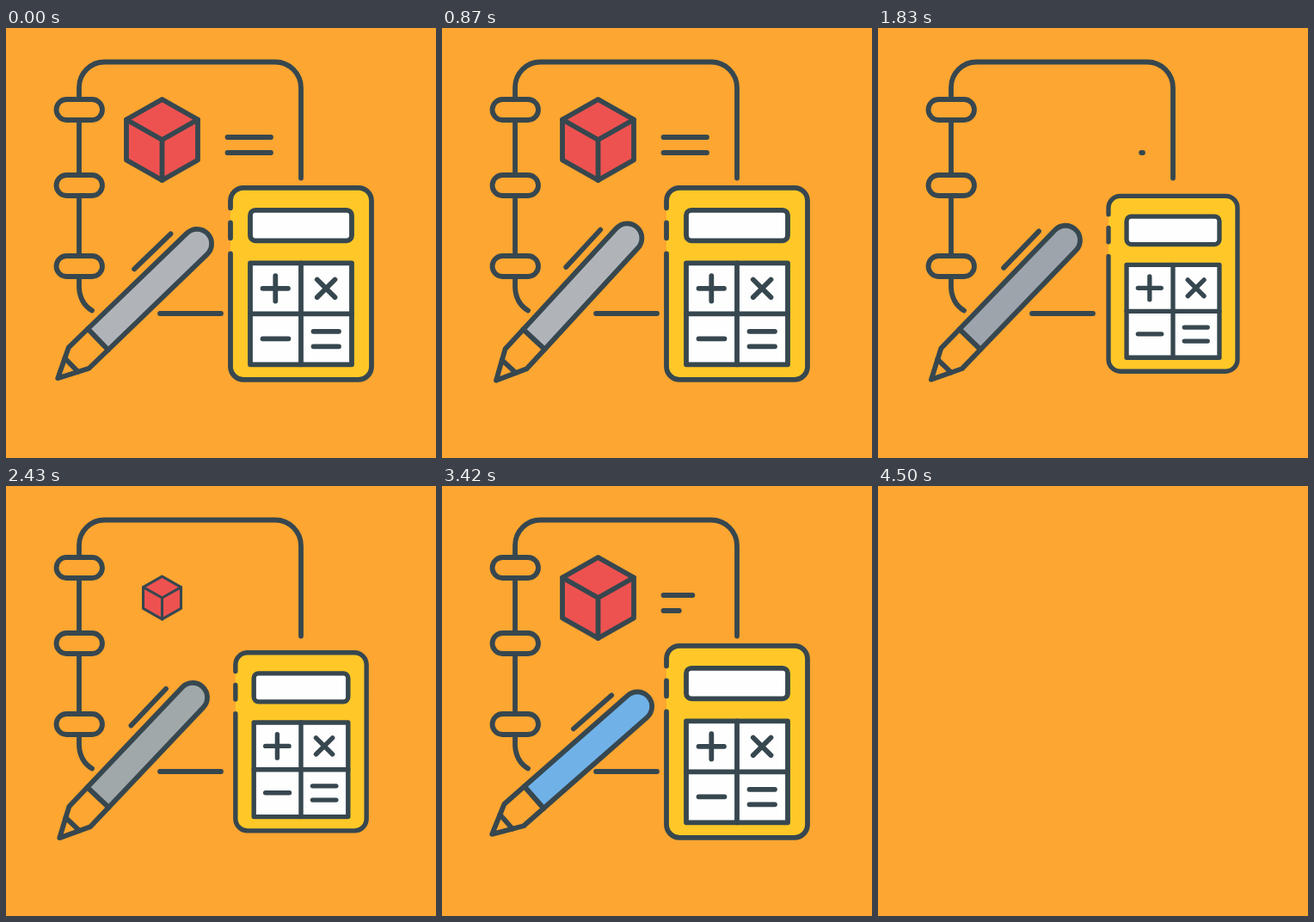
An HTML page for the animation above (4.53 s loop, 500 by 500 pixels).

```html
<!DOCTYPE html>
<html lang="en">
<head>
<meta charset="utf-8">
<title>Maths stationery</title>
<style>
  html, body { margin: 0; height: 100%; overflow: hidden; background: #fda631; }
  svg { display: block; width: 100vw; height: 100vh; }
  #art { fill: none; stroke: #37474f; stroke-width: 5.8; stroke-linecap: round; stroke-linejoin: round; }
  .paper { fill: #fda631; }
  .white { fill: #fefefe; }
</style>
</head>
<body>
<svg viewBox="0 0 500 500">
  <g id="art">
    <path d="M85 81V69A29.5 29.5 0 0 1 114.500 39.500H313A30 30 0 0 1 343 69.500V174.500
      M85 107V171M85 195V265M85 289V302Q86 320 100 328.500M179 332H250"/>
    <g class="paper">
      <rect x="58.500" y="83" width="53.500" height="24" rx="12"/>
      <rect x="58.500" y="171" width="53.500" height="24" rx="12"/>
      <rect x="58.500" y="265" width="53.500" height="24" rx="12"/>
    </g>
    <line id="line1" y1="127" y2="127"/>
    <line id="line2" y1="145" y2="145"/>

    <g id="cube">
      <path fill="#ee5250" d="M0-47L41.500-23.500V23.500L0 47L-41.500 23.500V-23.500Z"/>
      <path d="M-41.500-23.500L0 0L41.500-23.500M0 0V47"/>
    </g>

    <g id="calculator">
      <rect x="-82" y="-111.500" width="164" height="223" rx="15" fill="#ffc828" stroke="none"/>
      <path d="M-82-88V-96.500A15 15 0 0 1-67-111.500H67A15 15 0 0 1 82-96.500V96.500A15 15 0 0 1 67 111.500H-67A15 15 0 0 1-82 96.500V-35M-82-71V-53"/>
      <rect class="white" x="-59" y="-85.500" width="118" height="35.500" rx="6"/>
      <rect class="white" x="-59" y="-24" width="118" height="118"/>
      <path d="M0-24V94M-59 35H59
        M-44.500 5.500H-15M-29.700-9.200V20.300
        M18.800-4.800L39.500 15.800M39.500-4.800L18.800 15.800
        M-44.500 64H-14.500M14.500 55.500H44M14.500 73H44"/>
    </g>

    <g id="pen">
      <path class="paper" d="M0-17H-31L-65 0L-31 17H0Z"/>
      <path d="M-43-11V11M87-29.500H146"/>
      <path id="barrel" d="M0-17H160A17 17 0 0 1 160 17H0Z"/>
    </g>
  </g>
</svg>
<script>
const LOOP = 4530;
const [art, line1, line2, cube, calculator, pen, barrel] =
  ["art", "line1", "line2", "cube", "calculator", "pen", "barrel"].map(id => document.getElementById(id));

// Each key is [time in ms, value].
const penAngle = [[0, 44], [680, 49], [1110, 45], [1350, 46.6], [1640, 44], [1900, 46.5],
  [2170, 44], [2900, 53], [3500, 40.8], [4050, 50.5], [4500, 44]];
const cubeScale = [[1350, 1], [1710, 0], [2300, 0], [2560, 1.06], [2800, .975], [3100, 1]];
const calculatorScale = [[1350, 1], [2100, .88], [2850, 1]];
const barrelColor = [[0, "#b0b4b9"], [1200, "#9ea4ab"], [1950, "#a1a8aa"],
  [2700, "#adb1b5"], [3330, "#70b2e8"], [3510, "#b0b4b9"]];

const ease = x => (1 - Math.cos(Math.PI * Math.min(1, Math.max(0, x)))) / 2;

function valueAt(keys, t) {
  const next = keys.findIndex(key => key[0] > t);
  if (next === 0) return keys[0][1];
  if (next < 0) return keys[keys.length - 1][1];
  const [t0, v0] = keys[next - 1], [t1, v1] = keys[next];
  return v0 + (v1 - v0) * ease((t - t0) / (t1 - t0));
}

// The line is wiped away from its left end, then drawn again.
function drawLine(line, t, delay) {
  const wipe = ease((t - 1345 - delay) / 450);
  const grow = ease((t - 3145 - delay) / 450);
  const from = grow > 0 ? 0 : wipe;
  const to = grow > 0 ? grow : 1;
  line.setAttribute("x1", 257.5 + 50.5 * from);
  line.setAttribute("x2", 257.5 + 50.5 * to);
  line.style.display = to - from > .002 ? "" : "none";
}

function place(node, x, y, scale) {
  node.setAttribute("transform", `translate(${x} ${y}) scale(${scale})`);
}

function draw(now) {
  const t = now % LOOP;
  art.style.display = t < 4500 ? "" : "none";
  drawLine(line1, t, 0);
  drawLine(line2, t, 90);
  place(cube, 181.5, 130, valueAt(cubeScale, t));
  place(calculator, 343, 297.3, valueAt(calculatorScale, t));
  pen.setAttribute("transform", `translate(107 362) rotate(${-valueAt(penAngle, t)})`);
  barrel.setAttribute("fill", barrelColor.filter(key => key[0] <= t).pop()[1]);
}

let start;
function tick(now) {
  start ??= now;
  draw(Math.max(0, now - start));
  requestAnimationFrame(tick);
}
draw(0);
requestAnimationFrame(tick);
</script>
</body>
</html>
```
